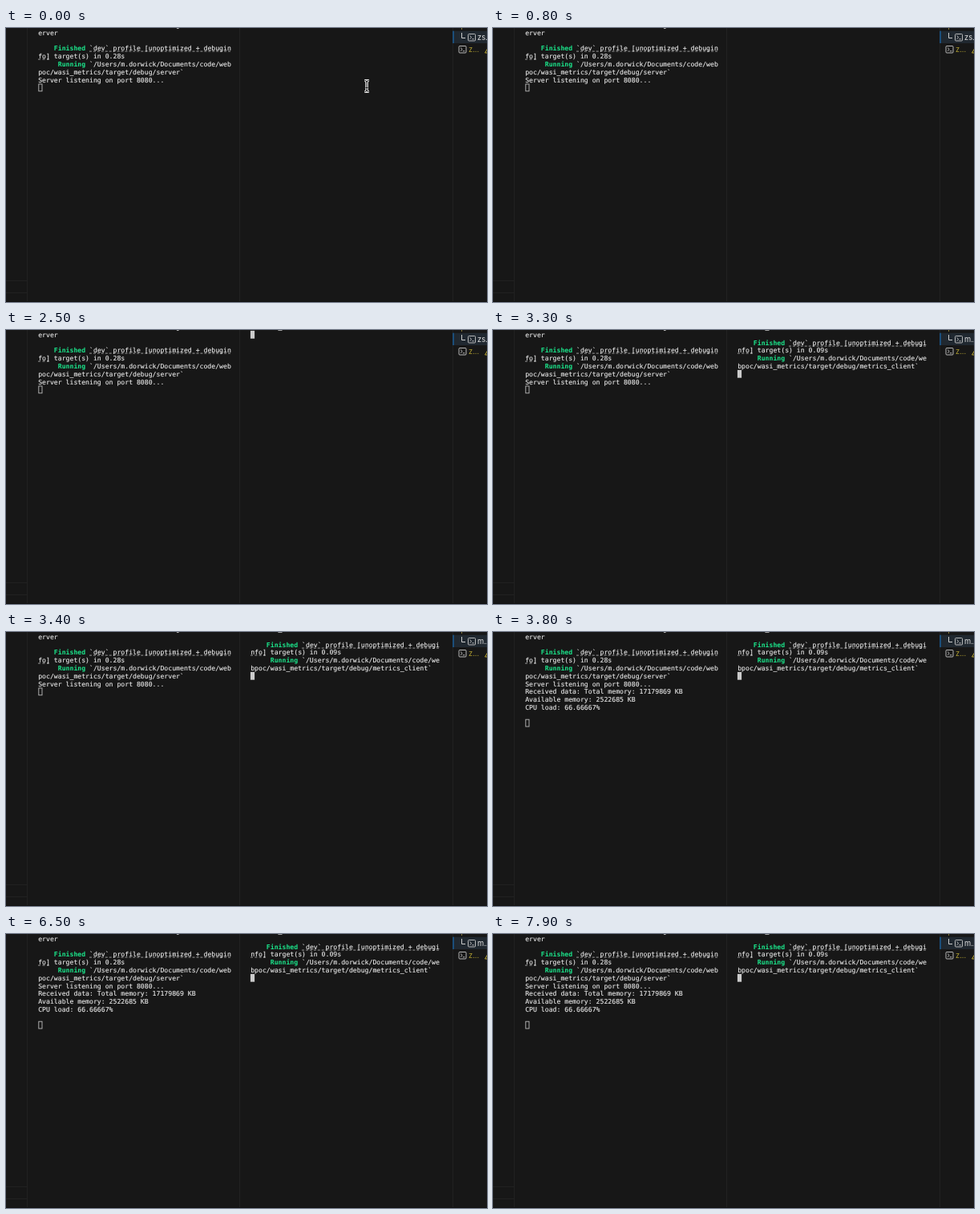
An HTML page that plays this animation: 600 px wide and 342 px high, repeating every 8000 ms.

```html
<!DOCTYPE html>
<html lang="en">
<head>
<meta charset="utf-8">
<style>
html, body { margin: 0; width: 100%; height: 100%; overflow: hidden; background: #171717; }
#stage { position: relative; width: 600px; height: 342px; overflow: hidden; }
pre, svg { position: absolute; margin: 0; }
svg { left: 0; top: 0; }
pre {
  top: 0; color: #ececec; font: 8.16px/9.8px "DejaVu Sans Mono", monospace;
  text-rendering: geometricPrecision; -webkit-text-stroke: .12px;
  transform: translateY(-8.4px);
}
pre b { color: #1be58b; -webkit-text-stroke: 0; }
pre u { text-decoration: underline dashed #999 .7px; text-underline-offset: 1.2px; text-decoration-skip-ink: none; }
#left { left: 40.2px; }
#right { left: 305.2px; }
svg text { font: 9.3px Inter, "Open Sans", sans-serif; }
</style>
</head>
<body>
<div id="stage">
  <svg width="600" height="342" fill="none">
    <path d="M26.5 0V342M291.5 0V342M557.5 0V342M0 315.5H26M0 330.5H26" stroke="#212121"/>
    <path d="M0 341.5H600" stroke="#111"/>
    <path d="M557 3.7H600V19H557Z" fill="#202830"/>
    <path d="M558 3.7V19" stroke="#1675c4"/>
    <path d="M568.5 0V2" stroke="#85793a"/>
    <path d="M568.5 6V12.5H573" stroke="#ccc"/>
    <g id="icon" stroke="#c8c8c8" stroke-width=".9">
      <rect x="576.5" y="7.5" width="9" height="8.5" rx="1"/>
      <path d="M578.5 9.5L580.7 11.6L578.5 13.7M581.3 13.8H583.8"/>
    </g>
    <use href="#icon" x="-11.5" y="15"/>
    <text id="tab" x="588" y="15" fill="#e0e0e0"></text>
    <text x="577" y="30" fill="#aa9a30">z...</text>
    <path d="M602 23.5L597.5 31H606Z" stroke="#b9a530"/>
    <g id="mouse">
      <path id="beam" d="M447.5 65.5Q450 65.5 450 67.5Q450 65.5 452.5 65.5M450 67V78M447.5 79.5Q450 79.5 450 77.5Q450 79.5 452.5 79.5M448.5 74.5H451.5" stroke="#eee" stroke-width="3"/>
      <use href="#beam"/>
      <path d="M447.5 65.5Q450 65.5 450 67.5Q450 65.5 452.5 65.5M450 67V78M447.5 79.5Q450 79.5 450 77.5Q450 79.5 452.5 79.5M448.5 74.5H451.5" stroke="#171717"/>
    </g>
    <rect id="hollow" x="40.8" width="4.2" height="8.8" stroke="#bbb" stroke-width=".9"/>
    <rect id="solid" x="304.9" width="5.2" height="9.8" fill="#cbcbcb"/>
  </svg>
  <pre id="left"></pre>
  <pre id="right"></pre>
</div>
<script>
const LOOP = 8000, ROW = 9.8;
const MOUSE_OFF = 100, ENTER = 1600, RUN = 3200, RECEIVE = 3500;
const $ = id => document.getElementById(id);

const path = "/Users/m.dorwick/Documents/code/webpoc/wasi_metrics/target/debug/";

// Cargo output, wrapped at the pane's column count.
function build(cols, secs, bin) {
  const info = "`dev` profile [unoptimized + debuginfo]", target = "`" + path + bin + "`";
  const cut = cols - 13;
  return `    <b>Finished</b> <u>${info.slice(0, cut)}</u>\n<u>${info.slice(cut)}</u> target(s) in ${secs}s\n` +
    `     <b>Running</b> ${target.slice(0, cut)}\n${target.slice(cut)}\n`;
}

// The first row of each pane is scrolled out, so only descenders show.
const server = "cargo run --bin s".padStart(49) + "\nerver\n\n" + build(49, "0.28", "server") +
  "Server listening on port 8080...\n";
const report = "Received data: Total memory: 17179869 KB\nAvailable memory: 2522685 KB\nCPU load: 66.66667%\n";
const command = "metrics_client\n";
const client = command + "\n" + build(48, "0.09", "metrics_client");

function setHtml(el, html) {
  if (el.shown !== html) el.innerHTML = el.shown = html;
}

function draw(t) {
  const received = t >= RECEIVE, running = t >= RUN, entered = t >= ENTER;
  setHtml($("left"), received ? server + report : server);
  setHtml($("right"), running ? client : entered ? command : "");
  setHtml($("tab"), running ? "m..." : "zs...");
  $("hollow").setAttribute("y", 1.4 + ROW * (received ? 11 : 7));
  $("solid").setAttribute("y", 0.9 + ROW * (running ? 5 : 0));
  $("solid").style.visibility = entered ? "visible" : "hidden";
  $("mouse").style.visibility = t < MOUSE_OFF ? "visible" : "hidden";
}

const start = performance.now();
function tick() {
  draw((performance.now() - start) % LOOP);
  requestAnimationFrame(tick);
}
tick();
</script>
</body>
</html>
```
